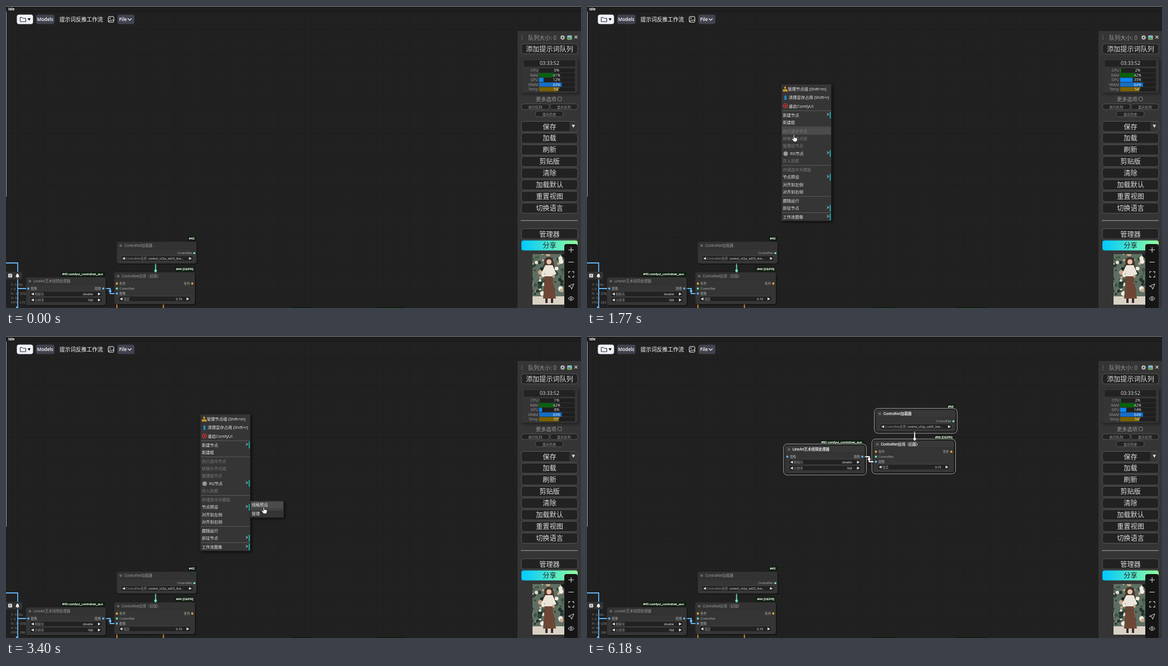
These frames come from a looping animation (1032x543 px, 6.2 s). An HTML page:

```html
<!DOCTYPE html>
<html lang="zh">
<head>
<meta charset="utf-8">
<title>Node presets</title>
<style>
html, body { margin: 0; width: 100%; height: 100%; overflow: hidden; background: #212121; }
svg { display: block; width: 100vw; height: 100vh; }
text { white-space: pre; }
.ui { font-family: "Open Sans", "Noto Sans CJK SC", "Noto Sans CJK", sans-serif; }
.node { font-family: "Liberation Sans", "Noto Sans CJK SC", "Noto Sans CJK", sans-serif; }
</style>
</head>
<body>
<svg id="stage" viewBox="0 0 1032 543" preserveAspectRatio="none"></svg>
<script>
const LOOP = 6200;
const MENU_OPEN = 1230, SUB_OPEN = 2660, PICK = 3520;
const BLUE = '#64b5f6', GREEN = '#6ee7b7', ORANGE = '#ffa931';

// ---- drawing helpers ----
const rect = (x, y, w, h, fill, r = 0, more = '') =>
  `<rect x="${x}" y="${y}" width="${w}" height="${h}" rx="${r}" fill="${fill}" ${more}/>`;
const dot = (x, y, r, fill, more = '') => `<circle cx="${x}" cy="${y}" r="${r}" fill="${fill}" ${more}/>`;
const line = (d, color, w = 1, more = '') =>
  `<path d="${d}" fill="none" stroke="${color}" stroke-width="${w}" ${more}/>`;
const shape = (d, fill, more = '') => `<path d="${d}" fill="${fill}" ${more}/>`;
const text = (x, cy, size, fill, str, more = '') =>
  `<text x="${x}" y="${cy + size * 0.36}" font-size="${size}" fill="${fill}" ${more}>${str}</text>`;
const END = 'text-anchor="end"', MID = 'text-anchor="middle"';
const border = (c, w = 1) => `stroke="${c}" stroke-width="${w}"`;

// ---- graph nodes ----
function pill(x, y, label, value, right) {
  return rect(x, y - 5, 131, 10, '#222', 5, border('#555', 0.6)) +
    shape(`M${x + 8} ${y - 2.6}v5.2l-5-2.6z`, '#ddd') +
    shape(`M${x + 123} ${y - 2.6}v5.2l5-2.6z`, '#ddd') +
    text(x + 9.5, y, 5.6, '#999', label) + text(right, y, 5.6, '#ddd', value, END);
}
function box(x, y, w, h, title, badge, badgeX, selected) {
  const tag = x + w - 2.5;
  return rect(badgeX - 2, y - 10, tag - badgeX + 4, 9, '#0f1f0f', 2) +
    text(badgeX, y - 5.7, 5.85, '#fff', badge, border('#fff', 0.2)) +
    rect(x + 1, y + 1, w + 1, h + 1, '#000', 4, 'opacity=".35"') +
    rect(x, y, w, h, '#353535', 4) +
    rect(x, y, w, 13, selected ? '#383838' : '#333', 4) +
    line(`M${x} ${y + 13}h${w}`, '#2c2c2c', 0.7) +
    dot(x + 6.8, y + 6.8, 2.4, '#666') +
    text(x + 13.3, y + 6.8, 6.5, selected ? '#fff' : '#999', title,
      selected ? border('#fff', 0.15) : '') +
    (selected ? rect(x - 2.8, y - 2.8, w + 5.6, h + 5.6, 'none', 6.5, border('#c4c4c4', 0.8)) : '');
}
const input = (x, y, color, name) => dot(x, y, 1.9, color) + text(x + 4.6, y, 5.6, '#aaa', name);
const output = (x, y, color, name) => dot(x, y, 1.9, color) + text(x - 4, y, 5.6, '#aaa', name, END);

function trio(ids, selected) {
  const c1 = selected ? '#fff' : GREEN, c2 = selected ? '#fff' : BLUE;
  return line('M268.5 462V479', c1, 1.8) +
    line('M174 508H187V517H199', c2, 1.8) +
    box(199, 424, 143, 39, 'ControlNet加载器', '#' + ids[0], 328.5, selected) +
    output(338, 444.3, GREEN, 'ControlNet') +
    pill(205.5, 454, 'ControlNet名称', 'control_v11p_sd15_line...', 319) +
    box(194.5, 479, 144.5, 57, 'ControlNet应用（旧版）', `#${ids[1]} [DEPR]`, 305.5, selected) +
    input(199, 499, ORANGE, '条件') + input(199, 508, GREEN, 'ControlNet') +
    input(199, 517, BLUE, '图像') + output(334.3, 499, ORANGE, '条件') +
    pill(201, 526.7, '强度', '0.70', 316) +
    box(36, 488, 143, 50, 'LineArt艺术线预处理器', `#${ids[2]} comfyui_controlnet_aux`, 101, selected) +
    input(40, 508, BLUE, '图像') + output(174.5, 508, BLUE, '图像') +
    pill(42, 517.8, '粗糙化', 'disable', 156) + pill(42, 528.6, '分辨率', '768', 156) +
    dot(268.5, 476, 2.4, c1) + dot(186.8, 512.5, 2.4, c2);
}

// ---- toolbar and left edge ----
function toolbar() {
  return rect(0, 0, 1032, 10, '#1e1e1e') + line('M0 .4H1032', '#aaa', 0.9) +
    line('M0 10.3H1032', '#151515', 0.8) + line('M.4 10V343', '#ccc', 0.9) +
    text(4, 5.6, 6.2, '#fff', 'Idle', 'font-weight="700"') +
    rect(19.5, 15.5, 29, 17, '#f1f3fb', 4) +
    line('M25.5 20.5h3.6l1.6 1.7h4.8v6h-10z', '#222', 1, 'stroke-linejoin="round"') +
    shape('M38.8 22h5.4l-2.7 4.6z', '#111') +
    rect(54, 15.5, 33, 17, '#41434f', 4) +
    text(70.3, 24, 8.3, '#fff', 'Models', MID + ' font-weight="600"') +
    text(96, 24.3, 9.75, '#fff', '提示词反推工作流') +
    rect(183.5, 19, 10, 10, 'none', 1.5, border('#fff')) + dot(186.5, 22, 1, '#fff') +
    line('M184 28l3.2-3 1.8 1.6 2-2 2.5 2.4', '#fff') +
    rect(200, 15.5, 30.5, 17, '#41434f', 4) +
    text(203, 24, 8.3, '#fff', 'File', 'font-weight="600"') +
    line('M218.5 22.5l3.4 3.2 3.4-3.2', '#fff', 1.2);
}
function corner() {
  return line('M0 462H21V543M21 508H40', BLUE, 1.8) + dot(20, 542, 2.2, BLUE) +
    '<g id="info"></g>' +
    rect(-3, 478, 32, 13.5, '#333', 3) +
    rect(4, 481.5, 7, 6.5, '#eee', 1) + line('M5.3 483.7h4.4M5.3 485.8h4.4', '#333', 0.8) +
    shape('M17 487.2c1.4-1 .8-6 3.6-6s2.2 5 3.6 6z', '#eee') + dot(20.6, 488.1, 1, '#eee');
}

// ---- sidebar ----
const button = (x, y, w, h, label, size, color = '#ddd') =>
  rect(x, y, w, h, '#222', 4, border('#555')) + text(x + w / 2, y + h / 2 + 0.4, size, color, label, MID);

function picture() {
  let seed = 7, leaves = '';
  const rnd = () => (seed = seed * 16807 % 2147483647) / 2147483647;
  const tones = ['#2c4238', '#1f332c', '#e9dfcb', '#3d5747', '#c8a98e', '#16241f', '#f2ece0'];
  for (let i = 0; i < 84; i++)
    leaves += dot(945 + rnd() * 57, 446 + rnd() * 72, 1.2 + rnd() * 3, tones[i % 7]);
  return '<g clip-path="url(#pic)">' + rect(945, 446, 57, 91, '#5f6f62') + leaves +
    rect(945, 522, 57, 15, '#d9d2c5') +
    shape('M966 461c-1-13 17-13 17 0l2 14h-21z', '#4a342a') + dot(974.5, 460, 4.5, '#e6c5ae') +
    shape('M968 466h13l7 16-5 2-2-4v9h-14v-9l-3 4-4-2z', '#ebe5da') +
    shape('M967 486h14l6 40h-23z', '#6d4736') +
    rect(968, 526, 4, 8, '#3b2b26') + rect(978, 526, 4, 8, '#3b2b26') + '</g>';
}
const meters = [['CPU', '#0aa015'], ['RAM', '#07630d'], ['GPU', '#0c86f4'], ['VRAM', '#176ec7'], ['Temp', '#7a6200']];
function sidebar() {
  let s = rect(918, 45, 114, 498, '#353535') +
    [53.5, 56.7, 59.9].map(y => dot(926, y, 0.7, '#999')).join('') +
    text(937, 57, 10, '#999', '队列大小: 0') +
    dot(999, 56.7, 2.3, 'none', border('#ccc', 1.6)) +
    dot(999, 56.7, 3.7, 'none', border('#ccc', 1.1) + ' stroke-dasharray="1.45"') +
    rect(1007.5, 53, 8, 7.5, '#e8d9a0', 0.8) + rect(1008.3, 53.8, 6.4, 3.2, '#62b5e5') +
    shape('M1008.3 59.7v-2l2-1.5 2 1.5 1-.8 1.4 1v1.8z', '#3d9a4a') +
    line('M1020.5 53.3l5 5m0-5l-5 5', '#ddd', 1.2) +
    button(925, 68, 101, 18, '添加提示词队列', 12.1) +
    rect(926, 96, 103, 63, '#1f1f1f', 4, 'opacity=".75" filter="url(#soft)"') +
    rect(925, 95, 101, 61, '#353535', 4) +
    rect(929.5, 97.5, 92, 11.5, '#222', 1) +
    text(975.5, 103.3, 8.8, '#eee', '03:33:52', MID);
  meters.forEach(([name, color], i) => {
    const y = 116 + i * 8.45;
    s += text(955, y, 6.6, '#999', name, END) + rect(957, y - 3.8, 64, 7.5, '#1f1f1f') +
      rect(957, y - 3.8, 0, 7.5, color, 0, `id="bar${i}"`) +
      text(988.3, y, 6.6, '#eee', '', `${MID} id="val${i}"`);
  });
  s += text(951, 167.5, 9.2, '#999', '更多选项') + rect(990.5, 163.8, 6.5, 6.5, 'none', 1, border('#999', 0.8)) +
    button(925, 176, 50, 10, '执行队列', 6.2, '#aaa') + button(976.5, 176, 49.5, 10, '显示队列', 6.2, '#aaa') +
    button(950, 189, 50, 10, '显示历史', 6.2, '#aaa');
  ['保存', '加载', '刷新', '剪贴版', '清除', '加载默认', '重置视图', '切换语言'].forEach((label, i) =>
    s += button(925, 207.5 + i * 20.95, 101, 18.5, label, 12.2));
  return s + rect(1011, 208, 14.5, 17.5, '#353535', 3) + shape('M1015.3 213.5h6l-3 5.5z', '#ddd') +
    line('M924 385.7H1026', '#aaa', 1.1) +
    button(925, 400.5, 101, 18.5, '管理器', 12.2) +
    rect(925, 421.5, 101, 18, 'url(#share)', 4) + text(975.5, 431, 12.2, '#222', '分享', MID) +
    picture() +
    rect(1002, 428, 24, 118, '#151515', 4) +
    line('M1009.5 438.5h9.5m-4.75-4.7v9.4M1009.5 460.5h9.5', '#ddd', 1.1) +
    line('M1010 480.5v-3h3m3 0h3v3m0 4v3h-3m-3 0h-3v-3', '#ddd', 1.1) +
    line('M1009.5 503.8l9.7-4.2-3.9 9.7-1.5-4.2z', '#ddd', 1, 'stroke-linejoin="round"') +
    line('M1009 526q5.2-7 10.4 0q-5.2 7-10.4 0z', '#ddd') + dot(1014.2, 526, 1.5, 'none', border('#ddd'));
}

// ---- context menu: [label, centre y, kind, text x] ----
const items = [
  ['管理节点组 (Shift+m)', 149.3, '', 360.5], ['清理显存占用 (Shift+r)', 164.7, '', 362], ['重启ComfyUI', 180, '', 362.3],
  ['新建节点', 196, '>'], ['新建框', 209.4, ''], ['执行选中节点', 225, '-'], ['转换为节点组', 238.4, '-'],
  ['管理组节点', 251.8, '-'], ['RG节点', 265, '>', 364.5], ['并入到框', 278.4, '-'], ['存储选中为模板', 294.4, '-'],
  ['节点预设', 307.8, '>'], ['对齐到左侧', 321, ''], ['对齐到右侧', 334.4, ''], ['跟随运行', 350, ''],
  ['前往节点', 363.4, '>'], ['工作流图像', 379.3, '>']
];
function menu() {
  let s = rect(351, 143, 90, 246, '#000', 0, 'opacity=".6" filter="url(#soft)"') +
    rect(349, 141, 89.5, 245.5, '#353535') +
    rect(350, 0, 88, 13, '#4b4b4b', 0, 'id="hover"');
  [188.3, 217.3, 286.6, 342.3, 371.6].forEach(y => s += line(`M350 ${y}H438`, '#666', 0.8));
  items.forEach(([label, y, kind, x = 351.5]) => {
    s += text(x, y, 7.3, kind === '-' ? '#7c7c7c' : '#eee', label);
    if (kind === '>')
      s += line(`M430.5 ${y - 3.3}l3.7 2-3.7 2`, '#ddd', 0.9) + rect(435.8, y - 6, 1.5, 12, '#00d5df');
  });
  return s + line('M355.7 147v3m-2.7 2v-2h5.6v2', '#e5a823', 1) +
    [[354.2, 145], [351.5, 151], [354.4, 151], [357.3, 151]].map(p => rect(p[0], p[1], 2.7, 2.7, '#e5a823')).join('') +
    shape('M356.2 160q3 3.2 1.3 6.2l1.5 2.3h-5.6l1.5-2.3q-1.7-3 1.3-6.2z', '#2b8fd0') +
    dot(356.2, 179.5, 3.7, '#4a1b1b', border('#e54848', 1.1)) + line('M354 179.5h4.4m-2.2-2.2v4.4', '#e54848') +
    dot(356.5, 265.5, 4, '#999');
}
function submenu() {
  return rect(440, 298, 61, 31, '#000', 0, 'opacity=".6" filter="url(#soft)"') +
    rect(438.5, 296.5, 60, 30, '#353535') +
    rect(439.5, 297.5, 58, 12.8, '#4b4b4b', 0, 'id="subHover"') +
    line('M439 312.3H498', '#666', 0.8) +
    text(441, 303.8, 7.3, '#eee', '线稿预设') + text(441, 319.7, 7.3, '#eee', '管理');
}
const cursors = {
  arrow: shape('M0 0v10l2.3-2 1.7 3.5 1.5-.7-1.7-3.4h3.1z', '#fff', border('#111', 0.6)),
  hand: shape('M-.9 1q.9-2 1.8 0v4l4 .9q1.4.4 1.2 2l-.7 2.7-.8 1.9h-5l-3.7-5q.2-1.6 1.7-.7l1.5 1.2z', '#fff', border('#111', 0.7)),
  cross: line('M-5.5 0h11M0-5.5v11', '#ddd', 1)
};

const $ = id => document.getElementById(id);
$('stage').innerHTML = `<defs>
  <pattern id="minor" width="4.68" height="4.68" patternUnits="userSpaceOnUse">
    <path d="M0 .3H4.68M.3 0V4.68" stroke="#1f1f1f" stroke-width=".5"/></pattern>
  <pattern id="major" width="46.8" height="46.8" x="21" y="41" patternUnits="userSpaceOnUse">
    <path d="M0 .4H46.8M.4 0V46.8" stroke="#1c1c1c" stroke-width=".8"/></pattern>
  <linearGradient id="share"><stop offset="0" stop-color="#00c9ff"/><stop offset="1" stop-color="#92fe9d"/></linearGradient>
  <clipPath id="pic">${rect(945, 446, 57, 91, '#000')}</clipPath>
  <filter id="soft" x="-10%" y="-20%" width="120%" height="140%"><feGaussianBlur stdDeviation="2"/></filter>
  </defs>` +
  rect(0, 0, 1032, 543, '#212121') + rect(0, 0, 1032, 543, 'url(#minor)') + rect(0, 0, 1032, 543, 'url(#major)') +
  `<g class="node">${corner()}${line('M199 536V543M282.5 536V543', ORANGE, 1.6)}
  ${rect(513, 541, 39, 3, '#0f1f0f', 1)}${rect(662, 541, 56, 3, '#0f1f0f', 1)}
  ${trio([43, 44, 45], false)}
  <g id="copy" transform="translate(319.6 -291)">${trio([58, 59, 60], true)}</g></g>
  <g class="ui">${toolbar()}${sidebar()}<g id="menu">${menu()}</g><g id="sub">${submenu()}</g></g>` +
  Object.keys(cursors).map(k => `<g id="${k}">${cursors[k]}</g>`).join('');

// ---- motion ----
// One row a second: CPU, RAM, GPU, VRAM, temperature
const stats = [
  [0, 41, 12, 63, 54], [2, 42, 35, 64, 54], [3, 42, 10, 64, 54], [1, 42, 8, 63, 55],
  [5, 42, 19, 65, 55], [0, 42, 27, 65, 55], [2, 42, 14, 64, 54]
];
// Memory and temperature refresh half a second ahead of the processor loads
const lead = [10, 500, 10, 500, 500];
const fps = [[0, 172], [350, 165], [950, 158], [1550, 163], [1900, 158], [3600, 154], [4020, 151], [4850, 161], [5500, 169]];
// time, x, y of the pointer tip
const path = [
  [50, 520, 31], [300, 440, 82], [650, 370, 126], [1150, 354.5, 147], [1400, 354.5, 147.5], [1950, 380, 272],
  [2200, 387, 301], [2550, 389, 302], [2950, 436, 304], [3220, 461, 305], [3520, 463, 304],
  [3850, 475, 268], [4110, 482.5, 217.5], [4580, 412, 118], [4880, 386, 84], [5140, 377.3, 106],
  [5350, 382, 104], [5720, 676, 2], [5790, 730, -14]
];
const ease = p => p * p * (3 - 2 * p);

// Smooth curve through the path points
function pointer(t) {
  const i = path.findIndex(p => p[0] > t);
  if (i < 1) return null;
  const a = path[i - 1], b = path[i], before = path[i - 2] || a, after = path[i + 1] || b;
  const span = b[0] - a[0], u = (t - a[0]) / span;
  return [1, 2].map(k => {
    const m = span * (b[k] - before[k]) / (b[0] - before[0]);
    const n = span * (after[k] - a[k]) / (after[0] - a[0]);
    return a[k] + (b[k] - a[k]) * ease(u) + m * u * (1 - u) ** 2 - n * u * u * (1 - u);
  });
}
const show = (id, on) => $(id).setAttribute('display', on ? 'inline' : 'none');
const inside = (p, x, y, w, h) => p && p[0] >= x && p[0] <= x + w && p[1] >= y && p[1] <= y + h;

function drawStats(t) {
  meters.forEach((m, i) => {
    const beat = (t + lead[i]) / 1000, n = Math.min(6, Math.floor(beat));
    const v = stats[n][i], was = stats[Math.max(0, n - 1)][i];
    const p = ease(Math.min(1, (beat - n) / 0.28));
    $('bar' + i).setAttribute('width', 0.64 * (was + (v - was) * p));
    $('val' + i).textContent = v + (i === 4 ? '°' : '%');
  });
}

function draw(t) {
  const open = t >= MENU_OPEN && t < PICK, sub = t >= SUB_OPEN && t < PICK, placed = t >= PICK;
  show('menu', open); show('sub', sub); show('copy', placed);

  const at = pointer(t);
  const overMenu = open && inside(at, 349, 141, 89.5, 246);
  const overSub = sub && inside(at, 438.5, 296, 60, 31);
  const overNode = placed && (inside(at, 353, 194, 148, 56) || inside(at, 512, 185, 149, 63));
  const kind = overMenu || overSub ? 'hand' : overNode ? 'cross' : 'arrow';
  for (const k in cursors) show(k, at && k === kind);
  if (at) $(kind).setAttribute('transform', `translate(${at[0]} ${at[1]})`);

  const row = overMenu && items.find(it => Math.abs(it[1] - at[1]) <= 6.7);
  show('hover', row);
  if (row) $('hover').setAttribute('y', row[1] - 6.5);
  show('subHover', overSub && at[1] < 312);

  drawStats(t);
  const rate = fps.filter(f => f[0] <= t).pop()[1];
  const info = ['T: 0.00s', 'I: 0', placed ? 'N: 20 [18]' : 'N: 17 [15]', placed ? 'V: 60' : 'V: 56', 'FPS: ' + rate];
  $('info').innerHTML = info.map((s, i) => text(9, 501 + i * 7.9, 6.1, '#888', s)).join('');
}

const start = performance.now();
function tick() {
  draw((performance.now() - start) % LOOP);
  requestAnimationFrame(tick);
}
tick();
</script>
</body>
</html>
```
